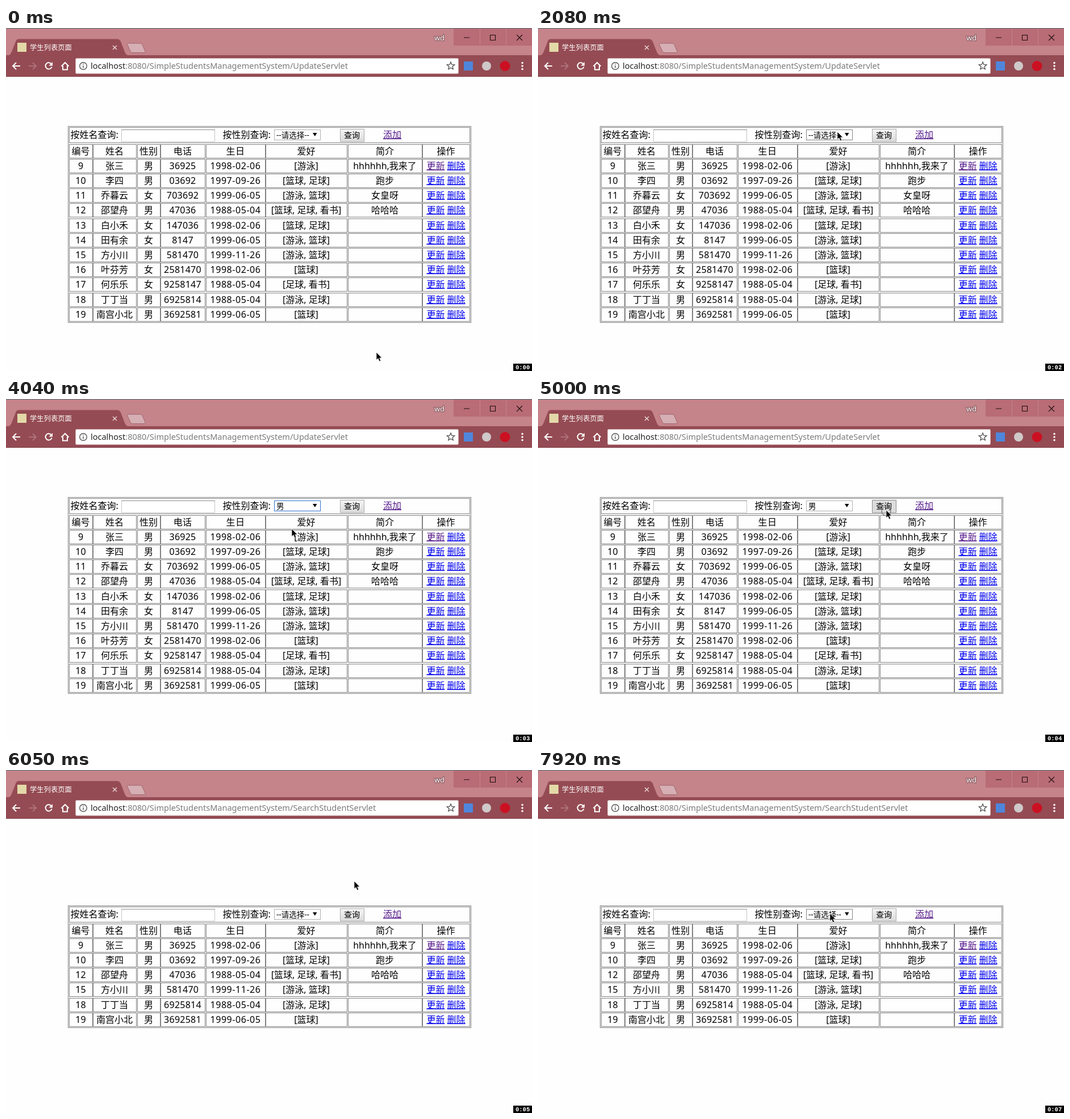
An HTML page that plays this animation: 926x605 px, repeating every 8000 ms.

```html
<!DOCTYPE html>
<html lang="zh-CN">
<head>
<meta charset="utf-8">
<title>学生列表页面</title>
<style>
  html, body { margin: 0; width: 100%; height: 100%; overflow: hidden; background: #fefefe; }
  svg { display: block; }
  text { font: 16px "Noto Sans", "Noto Sans CJK SC", "Noto Sans CJK", sans-serif; white-space: pre; }
  .mid { text-anchor: middle; }
  .num { letter-spacing: .25px; }
  .date { letter-spacing: .55px; }
  .link { fill: #00e; text-decoration: underline; }
  .seen { fill: #551a8b; text-decoration: underline; }
  .small { font-size: 13.5px; }
  .tab { font-size: 12.3px; fill: #fff; }
  .url { font-size: 14.5px; fill: #7b7b7b; }
  .clock { font: bold 10.5px "Liberation Mono", monospace; fill: #fff; }
  .grid { fill: none; stroke: #808080; shape-rendering: crispEdges; }
  .icon { fill: none; stroke: #fff; stroke-width: 2; }
  .dark { fill: none; stroke: #555; stroke-width: 1.4; }
</style>
</head>
<body>
<svg width="926" height="605" viewBox="0 0 926 605">
  <defs>
    <linearGradient id="face" x2="0" y2="1"><stop stop-color="#f4f4f4"/><stop offset="1" stop-color="#dadada"/></linearGradient>
    <linearGradient id="fade" gradientUnits="userSpaceOnUse" x1="155" x2="180" y1="0" y2="0">
      <stop stop-color="#fff"/><stop offset="1" stop-color="#fff" stop-opacity="0"/>
    </linearGradient>
  </defs>
  <rect width="926" height="605" fill="#fefefe"/>

  <!-- Browser frame -->
  <rect width="926" height="48" fill="#c5838a"/>
  <rect width="926" height="1" fill="#56707a"/>
  <rect x="788" y="1" width="138" height="30" fill="#b96c75"/>
  <path d="M834.5 1v30M880.5 1v30" stroke="#c5838a"/>
  <path d="M806 17h10M852.5 12.5h9v9h-9zM899 12l10 10M909 12l-10 10" fill="none" stroke="#1c0c0e" stroke-width="1.1"/>
  <text x="763" y="22" class="mid" style="font-size:13px" fill="#fff" stroke="#80545a" stroke-width="2" paint-order="stroke">wd</text>
  <rect y="48" width="926" height="38" fill="#954b53"/>
  <rect y="85" width="926" height="1" fill="#7d3c44"/>
  <path d="M4 48.5Q8 47 10 42L17 24Q18.5 19.5 22 19.5H196Q200 19.5 202 24L209 42Q211 47 215 48.5Z" fill="#954b53"/>
  <path d="M215 27H236Q239 27 240 29.5L245 41Q246 43.5 243 43.5H223Q220 43.5 219 41L213.500 29Q213 27 215 27Z" fill="#d5afb4" stroke="#a2656c"/>
  <path d="M188 31l7 7M195 31l-7 7" stroke="#f0dfe1" stroke-width="1.3"/>
  <g id="idleTab">
    <rect x="20" y="26" width="16" height="16" fill="#e3d9a8"/>
    <text x="42" y="38.5" class="tab">学生列表页面</text>
    <path class="icon" d="M80.2 64A5.7 5.7 0 1 0 80.7 68.5"/>
    <path d="M82 60v6.5h-6.5z" fill="#fff"/>
  </g>
  <g id="busyTab">
    <circle id="spinner" class="icon" cx="28" cy="34" r="6" transform="rotate(-75 28 34)"/>
    <text x="42.5" y="38.5" class="tab" style="fill:url(#fade)">localhost:8080/SimpleS</text>
    <path class="icon" d="M69.5 61.5l11 11M80.5 61.5l-11 11"/>
  </g>
  <path class="icon" d="M25 67H12.5M18 61l-6 6 6 6"/>
  <path class="icon" d="M40 67h12.5M47 61l6 6-6 6" style="stroke:#ad7279"/>
  <path class="icon" d="M97.5 67.5L104 61l6.5 6.5M100 66.5v7h8v-7"/>
  <rect x="122.5" y="53.5" width="674" height="27" rx="2" fill="#fff" stroke="#c9a5a9"/>
  <circle class="dark" cx="136" cy="67" r="6.3"/>
  <path class="dark" d="M136 66v4.500M136 63v1.6"/>
  <text x="149" y="72" class="url"><tspan fill="#222">localhost</tspan>:8080/SimpleStudentsManagementSystem/<tspan id="page"></tspan></text>
  <polygon id="star" class="dark"/>
  <rect x="806" y="59" width="16" height="16" fill="#4f86dc"/>
  <circle cx="846" cy="67" r="8" fill="#cfc9ca"/>
  <circle cx="878.5" cy="67" r="9" fill="#cb1022"/>
  <path d="M909 61.5v12" stroke="#fff" stroke-width="3.6" stroke-linecap="round" stroke-dasharray="0 5.5"/>

  <g id="tables"></g>

  <!-- Search bar, shared by both tables -->
  <g id="form">
    <text x="113.5" y="193.5">按姓名查询:</text>
    <rect x="203.5" y="179.5" width="164" height="21" fill="#fff" stroke="#c4c4c4"/>
    <path d="M203 179.5h165" stroke="#8c8c8c"/>
    <text x="381.5" y="193.5">按性别查询:</text>
    <rect id="select" x="472.5" y="179.5" width="81" height="18" fill="#fff"/>
    <text id="choice" x="476" y="193.5" class="small"></text>
    <path d="M540 185h7.5l-3.75 6z"/>
    <rect id="button" x="588.5" y="178.5" width="42" height="22"/>
    <text x="609" y="193.5" class="mid" style="font-size:14px">查询</text>
    <text x="664" y="193.5" class="seen">添加</text>
  </g>
  <g id="popup">
    <rect x="472.5" y="197.5" width="81" height="60" fill="#fff" stroke="#8a8a8a"/>
    <rect id="mark" x="473" width="80" height="19.7" fill="#1e90ff"/>
  </g>
  <circle id="ring" cx="613" cy="198" r="8" fill="none" stroke="#555"/>
  <path id="cursor" d="M0 0V13.6L3.1 10.8 5.2 15.9 7.7 14.9 5.6 9.900H9.7Z" stroke="#fff" stroke-width=".7"/>
  <rect x="893" y="592" width="33" height="13"/>
  <text id="clock" x="897" y="601.5" class="clock"></text>
</svg>
<script>
const LOOP = 8000, SECOND = 1040, TICK = 130;
const TOP = 173, SHIFT = 66, PITCH = 26.2, OPTION = 19.7;
const $ = id => document.getElementById(id);

function add(parent, tag, attrs, content = "") {
  const node = document.createElementNS("http://www.w3.org/2000/svg", tag);
  for (const key in attrs) node.setAttribute(key, attrs[key]);
  node.textContent = content;
  return parent.appendChild(node);
}

const starPoint = (_, i) => {
  const angle = i * Math.PI / 5, radius = i % 2 ? 3.2 : 7;
  return [783 + radius * Math.sin(angle), 67 - radius * Math.cos(angle)];
};
$("star").setAttribute("points", Array.from({ length: 10 }, starPoint).join(" "));

// Cells follow one another with a constant gap
let edge = 111;
const columns = [41, 76, 40, 78, 104, 143, 130, 83].map(width => {
  const left = edge;
  edge += width + 1.5;
  return [Math.floor(left), Math.floor(left + width)];
});
const header = "编号|姓名|性别|电话|生日|爱好|简介|操作".split("|");
const styles = ["", "", "", "num", "date", "", "", ""];

// Name, gender, phone length, birthday, hobbies, introduction
const students = `张三|男|5|1998-02-06|游泳|hhhhhh,我来了
李四|男|5|1997-09-26|篮球, 足球|跑步
乔暮云|女|6|1999-06-05|游泳, 篮球|女皇呀
邵望舟|男|5|1988-05-04|篮球, 足球, 看书|哈哈哈
白小禾|女|6|1998-02-06|篮球, 足球|
田有余|女|4|1999-06-05|游泳, 篮球|
方小川|男|6|1999-11-26|游泳, 篮球|
叶芬芳|女|7|1998-02-06|篮球|
何乐乐|女|7|1988-05-04|足球, 看书|
丁丁当|男|7|1988-05-04|游泳, 足球|
南宫小北|男|7|1999-06-05|篮球|`.split("\n").map((line, i) => {
  const [name, gender, length, birthday, hobbies, intro] = line.split("|");
  const id = i + 9;
  const phone = Array.from({ length }, (_, k) => (id * 7 + k * 3) % 10).join("");
  return [id, name, gender, phone, birthday, `[${hobbies}]`, intro, ""];
});

function box(parent, left, top, right, bottom) {
  add(parent, "rect", { class: "grid", x: left + .5, y: top + .5, width: right - left, height: bottom - top });
}

function buildTable(rows, top) {
  const group = add($("tables"), "g", {});
  box(group, 109, top, 818, Math.round(top + 58 + rows.length * PITCH));
  box(group, 111, top + 2, 816, top + 29);
  [header, ...rows].forEach((row, i) => {
    const y = Math.round(top + 31.6 + i * PITCH);
    columns.forEach(([left, right], c) => {
      box(group, left, y, right, y + 24);
      const label = add(group, "text", { class: "mid " + styles[c], x: (left + right) / 2, y: y + 17.5 }, row[c]);
      if (i && !row[c] && c === 7) {
        add(label, "tspan", { class: i === 1 ? "seen" : "link" }, "更新");
        add(label, "tspan", {}, " ");
        add(label, "tspan", { class: "link" }, "删除");
      }
    });
  });
  return group;
}

const fullTable = buildTable(students, TOP);
const maleTable = buildTable(students.filter(row => row[2] === "男"), TOP + SHIFT);
const options = ["--请选择--", "男", "女"].map((label, i) =>
  add($("popup"), "text", { class: "small", x: 476, y: 212.5 + i * OPTION }, label));

// Pointer moves: first jump, last jump, destination
const moves = [
  [650, 800, 687, 571], [950, 1170, 668, 404], [1320, 1560, 543, 175], [1710, 2080, 527, 183],
  [2600, 2720, 511, 213], [2870, 3360, 503, 229], [4310, 4460, 601, 209], [4610, 5000, 613, 196],
  [6450, 6810, 510, 239], [6960, 7180, 509, 252], [7490, 7920, 514, 253]
];
const easeOut = p => 1 - (1 - p) ** 1.5;

// The pointer was sampled about once per tick, so each move advances in jumps
function pointerAt(t) {
  let x = 652, y = 572;
  for (const [from, to, nextX, nextY] of moves) {
    if (t < from) break;
    const gaps = Math.round((to - from) / TICK);
    const jump = Math.min(gaps, Math.floor((t - from) / (to - from) * gaps));
    const p = easeOut((jump + 1) / (gaps + 1));
    x += (nextX - x) * p;
    y += (nextY - y) * p;
  }
  return [Math.round(x), Math.round(y)];
}

const show = (node, on) => node.setAttribute("display", on ? "inline" : "none");
const paint = (node, fill, stroke) => { node.setAttribute("fill", fill); node.setAttribute("stroke", stroke); };

function render(t) {
  const during = (from, to) => t >= from && t < to;
  const loaded = t >= 5150, busy = during(5150, 5370);
  const [x, y] = pointerAt(t);

  show(fullTable, !loaded);
  show(maleTable, loaded);
  $("form").setAttribute("transform", `translate(0 ${loaded ? SHIFT : 0})`);
  $("page").textContent = loaded ? "SearchStudentServlet" : "UpdateServlet";
  show($("idleTab"), !busy);
  show($("busyTab"), busy);
  $("spinner").setAttribute("stroke-dasharray", `${4 + Math.max(0, t - 5150) / 10} 40`);

  const focused = during(2230, 4880);
  const hovered = during(1980, 2230) || t >= 6960;
  paint($("select"), "#fff", focused ? "#2f71cf" : hovered ? "#858585" : "#b0b0b0");
  $("choice").textContent = during(3920, 5150) ? "男" : "--请选择--";

  const pressed = during(4880, 5150), over = during(4610, 4880);
  paint($("button"), pressed ? "#dcdcdc" : "url(#face)", pressed || over ? "#8f8f8f" : "#adadad");
  show($("ring"), during(5000, 5150));

  const active = y > 198 + OPTION ? 1 : 0;
  show($("popup"), during(2350, 3920));
  $("mark").setAttribute("y", 198 + active * OPTION);
  options.forEach((option, i) => option.setAttribute("fill", i === active ? "#fff" : "#000"));

  $("cursor").setAttribute("transform", `translate(${x} ${y})`);
  $("clock").textContent = "0:0" + Math.floor(t / SECOND);
}

const start = performance.now();
function frame() {
  render((performance.now() - start) % LOOP);
  requestAnimationFrame(frame);
}
frame();
</script>
</body>
</html>
```
